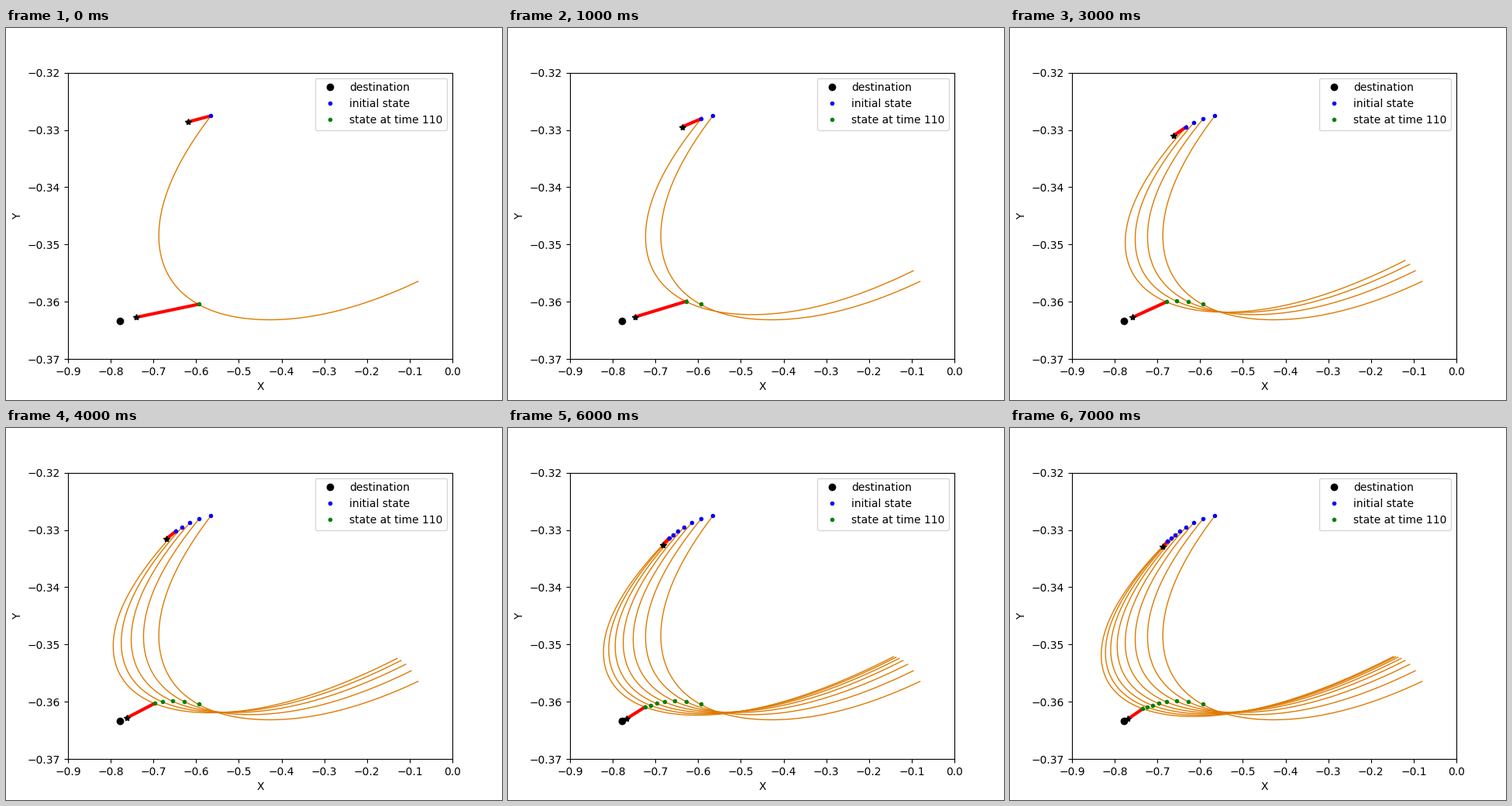
Animation, 640 px wide and 480 px high, one loop 8 s. Source, as a matplotlib script:

```python
import numpy as np
import matplotlib.pyplot as plt
from matplotlib.animation import FuncAnimation

RUNS = 8
DECAY = 0.81    # each run moves this much less than the one before
HANDLE = 0.63   # handle length of the bend, as a share of its width and height

progress = 1 - DECAY ** np.arange(RUNS)


def track(first, middle, last):
    """Points of all runs, settling along a parabola through three of them."""
    knots = progress[[0, 3, RUNS - 1]]
    fit = np.polyfit(knots, [first, middle, last], 2)
    return np.array([[u * u, u, 1] for u in progress]) @ fit


def to_data(points):
    """Convert stage pixels to axis units."""
    x, y = np.asarray(points, float).T
    return -0.9 + (x - 80) * 0.9 / 496, -0.32 - (y - 57.6) * 0.05 / 369.6


def bezier(*pts):
    t = np.linspace(0, 1, 60)[:, None]
    pts = [np.asarray(p, float) for p in pts]
    while len(pts) > 1:
        pts = [a + (b - a) * t for a, b in zip(pts, pts[1:])]
    return pts[0]


def trajectory(start, left, low, end):
    """Bend from left to low, with arms that match its curvature."""
    (lx, ly), (bx, by) = left, low
    w, h = bx - lx, by - ly
    rest = 2 / 3 * (1 - HANDLE)
    bend_left = rest * w / (HANDLE * h) ** 2
    bend_low = rest * h / (HANDLE * w) ** 2
    up = np.sqrt(0.5 * (start[0] - lx) / bend_left)
    out = np.sqrt(0.5 * (by - end[1]) / bend_low)
    return np.vstack([
        bezier(start, (lx, ly - up), left),
        bezier(left, (lx, ly + HANDLE * h), (bx - HANDLE * w, by), low),
        bezier(low, (bx + out, by), end),
    ])


# Stage positions in the first, fourth and last run
start = track((264.4, 113.3), (227.4, 127.6), (203.3, 146.2))
left = track((197.2, 268), (148.7, 277), (117.7, 293))
low = track((340, 376.5), (278, 366.7), (237, 372.2))
end = track((531.6, 327), (509.7, 300), (494.6, 295))
mid = track((249.4, 356.3), (202.3, 353.2), (171.4, 362.2))
top_star = track((234.5, 121.3), (211.4, 138.7), (197.2, 153.5))
low_star = track((167.5, 373.4), (158.3, 373.3), (152.4, 375.3))

fig, ax = plt.subplots(figsize=(6.4, 4.8), dpi=100)
ax.set(xlim=(-0.9, 0), ylim=(-0.37, -0.32), xlabel="X", ylabel="Y")

paths = [ax.plot(*to_data(trajectory(*p)), color="#de7a00", lw=1)[0]
         for p in zip(start, left, low, end)]
rods = [ax.plot([], [], "r-", lw=3)[0] for _ in range(2)]
ax.plot(*to_data([(147.3, 377.9)]), "ko", label="destination")
start_dots, = ax.plot([], [], "b.", label="initial state")
mid_dots, = ax.plot([], [], "g.", label="state at time 110")
stars, = ax.plot([], [], "k*")
ax.legend(loc="upper right")


def update(i):
    for n, path in enumerate(paths):
        path.set_visible(n <= i)
    start_dots.set_data(*to_data(start[:i + 1]))
    mid_dots.set_data(*to_data(mid[:i + 1]))
    rods[0].set_data(*to_data([start[i], top_star[i]]))
    rods[1].set_data(*to_data([mid[i], low_star[i]]))
    stars.set_data(*to_data([top_star[i], low_star[i]]))
    return [*paths, *rods, start_dots, mid_dots, stars]


anim = FuncAnimation(fig, update, frames=RUNS, interval=1000, repeat=True,
                     repeat_delay=0)
plt.show()
```
